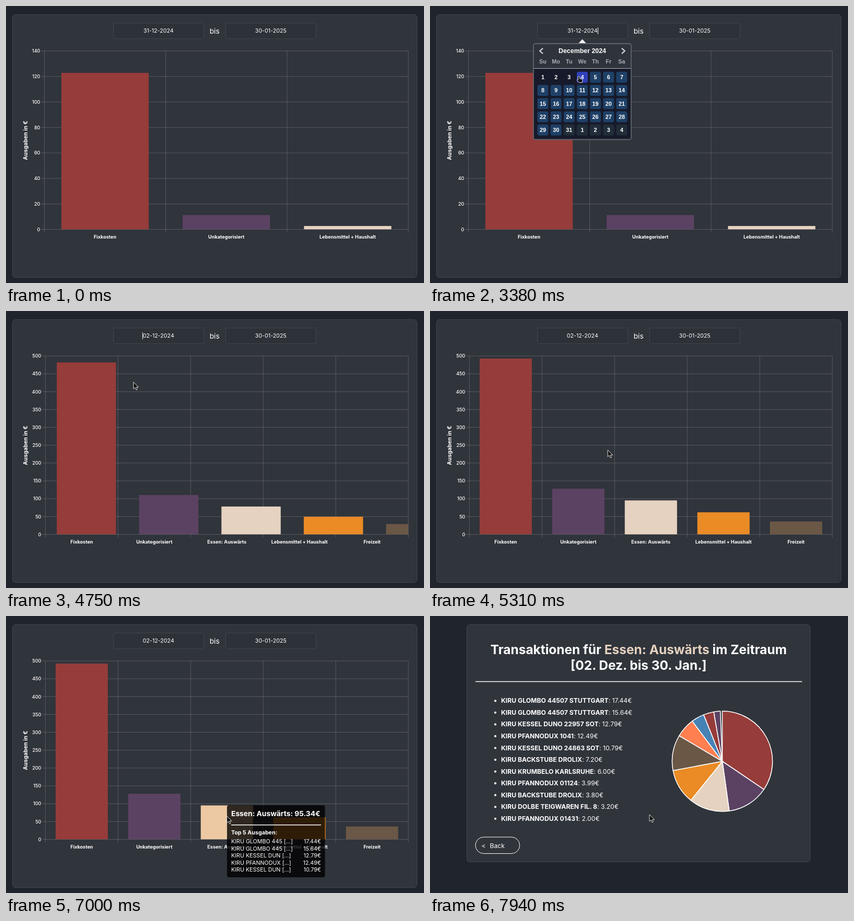
Recreate the animation shown at these times as an HTML page. Size 800x530 px, loop 8000 ms.

```html
<!DOCTYPE html>
<html lang="de">
<head>
<meta charset="utf-8">
<title>Ausgaben</title>
<style>
html, body { margin: 0; width: 100%; height: 100%; overflow: hidden; background: #20242c; }
svg { display: block; width: 800px; height: 530px; font-family: Inter, sans-serif; font-optical-sizing: none; fill: #fff; }
text { white-space: pre; }
.cal { font-family: "Liberation Sans", Arial, sans-serif; font-weight: 700; }
</style>
</head>
<body>
<svg id="stage" viewBox="0 0 800 530"></svg>
<script>
const LOOP = 8000;
const OPEN = 1850, PICK = 4270, UPDATE = 4420, HOVER = 5720, PAGE = 7190, PIE = 7225;
const RED = '#963c3a', PURPLE = '#5b4263', BEIGE = '#e5d2c0', ORANGE = '#ea8b25', BROWN = '#6b5746';
const PALETTE = [RED, PURPLE, BEIGE, ORANGE, BROWN, '#ff7f50', '#4682b4'];
const TOP = 86, BASE = 427.5, RIGHT = 770;

const before = {
  left: 73.5, max: 140, step: 20,
  names: ['Fixkosten', 'Unkategorisiert', 'Lebensmittel + Haushalt'],
  values: [122.8, 11.3, 2.7]
};
const after = {
  left: 75.5, max: 500, step: 50,
  names: ['Fixkosten', 'Unkategorisiert', 'Essen: Auswärts', 'Lebensmittel + Haushalt', 'Freizeit'],
  values: [492.7, 128, 95.34, 62, 36.3]
};
const sales = [
  ['KIRU GLOMBO 44507 STUTTGART', 17.44],
  ['KIRU GLOMBO 44507 STUTTGART', 15.64],
  ['KIRU KESSEL DUNO 22957 SOT', 12.79],
  ['KIRU PFANNODUX 1041', 12.49],
  ['KIRU KESSEL DUNO 24863 SOT', 10.79],
  ['KIRU BACKSTUBE DROLIX', 7.2],
  ['KIRU KRUMBELO KARLSRUHE', 6],
  ['KIRU PFANNODUX 01124', 3.99],
  ['KIRU BACKSTUBE DROLIX', 3.8],
  ['KIRU DOLBE TEIGWAREN FIL. 8', 3.2],
  ['KIRU PFANNODUX 01431', 2]
];
const shares = [...sales.reduce((m, [n, v]) => m.set(n, (m.get(n) || 0) + v), new Map()).values()];
const total = shares.reduce((a, b) => a + b);

// pointer path: time, x, y
const path = [
  [850, 800, 312], [1200, 560, 190], [1560, 330, 95], [1680, 323, 47], [2100, 323, 47],
  [2400, 330, 130], [2700, 345, 180], [3000, 318, 180], [3330, 285, 135], [3430, 285, 135],
  [3700, 244, 136], [4900, 244, 136], [5250, 325, 245], [5600, 412, 365], [5700, 423, 383],
  [7350, 422.5, 382.5], [7900, 420, 380]
];

const clamp = v => Math.max(0, Math.min(1, v));
const mix = (a, b, k) => a + (b - a) * k;
const easeOut = k => 1 - (1 - clamp(k)) ** 4;
const euro = v => v.toFixed(2) + '€';
const repeat = (n, fn) => Array.from({ length: n }, (_, i) => fn(i)).join('');

const rect = (x, y, w, h, fill, extra = '') =>
  `<rect x="${x}" y="${y}" width="${w}" height="${h}" fill="${fill}" ${extra}/>`;
const line = (x1, y1, x2, y2, stroke, w = 1) =>
  `<path d="M${x1} ${y1}L${x2} ${y2}" stroke="${stroke}" stroke-width="${w}"/>`;
const text = (x, y, s, size, anchor = 'middle', weight = 400, extra = '') =>
  `<text x="${x}" y="${y}" font-size="${size}" text-anchor="${anchor}" font-weight="${weight}" ${extra}>${s}</text>`;
const panel = (x, y, w, h) => rect(x, y, w, h, '#30343b', 'rx="6" stroke="#43474e"');

function pointer(t) {
  if (t < path[0][0]) return null;
  const i = path.findIndex(p => p[0] > t);
  if (i < 0) return path[path.length - 1].slice(1);
  const a = path[i - 1], b = path[i], k = (t - a[0]) / (b[0] - a[0]);
  return [mix(a[1], b[1], k), mix(a[2], b[2], k)];
}

function cursor(t, open) {
  const p = pointer(t);
  if (!p) return '';
  const [x, y] = p;
  let d = 'M0 0V13L3 10.3 5.2 15 7.4 14 5.3 9.7H9.4Z';
  if (y < 62) d = 'M-2.5-6H-.6V6H-2.5V7.2H2.5V6H.6V-6H2.5V-7.2H-2.5Z';
  else if (open && y > 122)
    d = 'M-1.6 0Q0-2 1.3 0V4L6 5.2Q7.3 5.6 7 7.5L6 11.5H.2L-3.6 7.2Q-4.2 5.4-1.6 6.2Z';
  return `<path transform="translate(${x} ${y})" d="${d}" fill="#111" stroke="#f4f4f4" stroke-width=".9" stroke-linejoin="round"/>`;
}

function inputs(t) {
  const box = (x, date) => rect(x, 32.5, 173, 30, '#2d3138', 'rx="3.5" stroke="#41454c"') + text(x + 86.3, 51.4, date, 10.7);
  let s = box(205.5, t < PICK ? '31-12-2024' : '02-12-2024') + box(420.5, '30-01-2025') + text(399.2, 53, 'bis', 13.75);
  const since = t - (t < PICK ? OPEN : PICK);
  if (since >= 0 && since % 1060 < 530) {
    const x = t < PICK ? 321.5 : 261.5;
    s += line(x, 41, x, 54, '#fff');
  }
  return s;
}

const slot = (c, i) => {
  const w = (RIGHT - c.left) / c.names.length;
  return { x: c.left + w * (i + .14), w: w * .72, h: (c.values[i] || 0) / c.max * (BASE - TOP) };
};

function chart(t) {
  const c = t < UPDATE ? before : after;
  const n = c.names.length, cell = (RIGHT - c.left) / n, ticks = c.max / c.step;
  const grid = 'rgba(255,255,255,.19)';
  const k = easeOut((t - UPDATE) / 1000);
  let s = repeat(ticks + 1, i => {
    const y = BASE - i * (BASE - TOP) / ticks;
    return line(c.left - 6, y, RIGHT, y, grid) + text(c.left - 8, y + 3.2, i * c.step, 9.12, 'end', 500);
  });
  s += repeat(n + 1, i => line(c.left + i * cell, TOP, c.left + i * cell, BASE + 6, grid));
  s += '<g clip-path="url(#area)">' + repeat(n, i => {
    const a = slot(before, i), b = slot(c, i);
    const x = mix(a.x, b.x, k), w = mix(a.w, b.w, k), h = mix(a.h, b.h, k);
    let fill = c === before && i === 2 ? BEIGE : PALETTE[i];
    if (i === 2 && t >= HOVER) fill = '#ecc9a2';
    return rect(x, BASE - h, w, h, fill);
  }) + '</g>';
  s += repeat(n, i => text(c.left + cell * (i + .5), 444.7, c.names[i], 9.12, 'middle', 700));
  return s + text(0, 0, 'Ausgaben in €', 10.7, 'middle', 700, 'transform="translate(41 257) rotate(-90)"');
}

function calendar(t) {
  const col = i => 216 + i * 25.15, row = i => 136.2 + i * 25.25;
  const [px, py] = pointer(t);
  const c = Math.floor((px - 203.5) / 25.15), r = Math.floor((py - 123.5) / 25.25);
  const hover = c >= 0 && c < 7 && r >= 0 ? r * 7 + c : 99;
  const chevron = d => `<path d="${d}" fill="none" stroke="#cdd0d4" stroke-width="2.3"/>`;
  let s = '<path d="M284 71.5L291.5 63.5 299 71.5Z" fill="#f0f0f2"/>';
  s += rect(198, 72, 187, 183.5, '#171a2a', 'rx="4"');
  s += '<path d="M198 119.5V76Q198 72 202 72H381Q385 72 385 76V119.5Z" fill="#2f333b"/>';
  s += line(198, 119.5, 385, 119.5, '#b4b7bb');
  s += rect(198, 72, 187, 183.5, 'none', 'rx="4" stroke="#60656d" stroke-width="1.8"');
  s += chevron('M216 80.8L210.3 86 216 91.2') + chevron('M367 80.8L372.7 86 367 91.2');
  s += text(291.5, 90.4, 'December 2024', 12.4, 'middle', 700);
  s += ['Su', 'Mo', 'Tu', 'We', 'Th', 'Fr', 'Sa'].map((d, i) => text(col(i), 110, d, 10.8, 'middle', 700, 'fill="#a9adb3"')).join('');
  s += repeat(35, i => {
    const x = col(i % 7), y = row(Math.floor(i / 7));
    const fill = i > 29 ? '#212d39' : i === hover ? '#2f40bb' : i > hover ? '#1f4067' : '';
    return (fill ? rect(x - 10.5, y - 10.5, 21, 21, fill, 'rx="3.5"') : '') +
      text(x, y + 3.8, i < 31 ? i + 1 : i - 30, 10.8, 'middle', 700);
  });
  return `<g class="cal">${s}</g>`;
}

function tooltip(t) {
  const cut = ['GLOMBO 445', 'GLOMBO 445', 'KESSEL DUN', 'PFANNODUX', 'KESSEL DUN'];
  return `<g opacity="${clamp((t - HOVER) / 120)}">` +
    rect(423, 362, 187.5, 138, 'rgba(0,0,0,.8)', 'rx="4"') +
    text(431, 383.3, 'Essen: Auswärts: 95.34€', 13.8, 'start', 700) +
    line(431, 399.7, 603, 399.7, '#fff', 1.5) +
    text(431, 418, 'Top 5 Ausgaben:', 10.7, 'start', 700) +
    cut.map((n, i) => text(431, 435.4 + i * 13.5, `KIRU ${n} [...]`, 10.7, 'start') +
      text(603, 435.4 + i * 13.5, euro(sales[i][1]), 10.7, 'end')).join('') + '</g>';
}

function pie(t) {
  const k = easeOut((t - PIE) / 1000), cx = 559.5, cy = 278, r = 96;
  const at = a => `${cx + r * Math.sin(a)} ${cy - r * Math.cos(a)}`;
  let a = 0;
  if (!k) return '';
  return shares.map((v, i) => {
    const from = a;
    a += v / total * 2 * Math.PI * k;
    return `<path d="M${cx} ${cy}L${at(from)}A${r} ${r} 0 ${a - from > Math.PI ? 1 : 0} 1 ${at(a)}Z" fill="${PALETTE[i % 7]}" stroke="#fff" stroke-width="1.55" stroke-linejoin="round"/>`;
  }).join('');
}

function details(t) {
  let s = panel(70.5, 16.5, 657, 454);
  s += text(399.3, 73, `Transaktionen für <tspan fill="${BEIGE}">Essen: Auswärts</tspan> im Zeitraum`, 24.45, 'middle', 700);
  s += text(399.3, 102.7, '[02. Dez. bis 30. Jan.]', 24.45, 'middle', 700);
  s += line(87, 125.5, 712, 125.5, '#fff', 1.5);
  s += sales.map(([n, v], i) => {
    const y = 166.3 + i * 22.55;
    return `<circle cx="125" cy="${y - 4}" r="2.1"/>` +
      text(136, y, `<tspan font-weight="700">${n}</tspan>: ${euro(v)}`, 12.2, 'start');
  }).join('');
  s += rect(87, 423, 84.7, 31.5, 'none', 'rx="15.7" stroke="#fff"');
  s += text(98.5, 443.5, '&lt;', 12.2, 'start') + text(114.5, 443.5, 'Back', 12.2, 'start');
  return s + pie(t);
}

function scene(t) {
  const open = t >= OPEN && t < PICK;
  let s = `<clipPath id="area"><rect x="73" y="${TOP}" width="${RIGHT - 73}" height="${BASE - TOP}"/></clipPath>`;
  s += rect(0, 0, 800, 530, '#20242c');
  if (t >= PAGE) s += details(t);
  else {
    s += panel(12.5, 16.5, 774, 503) + inputs(t) + chart(t);
    if (open) s += calendar(t);
    if (t >= HOVER) s += tooltip(t);
  }
  return s + cursor(t, open);
}

const stage = document.getElementById('stage');
const start = performance.now();
function frame() {
  stage.innerHTML = scene((performance.now() - start) % LOOP);
  requestAnimationFrame(frame);
}
frame();
</script>
</body>
</html>
```
